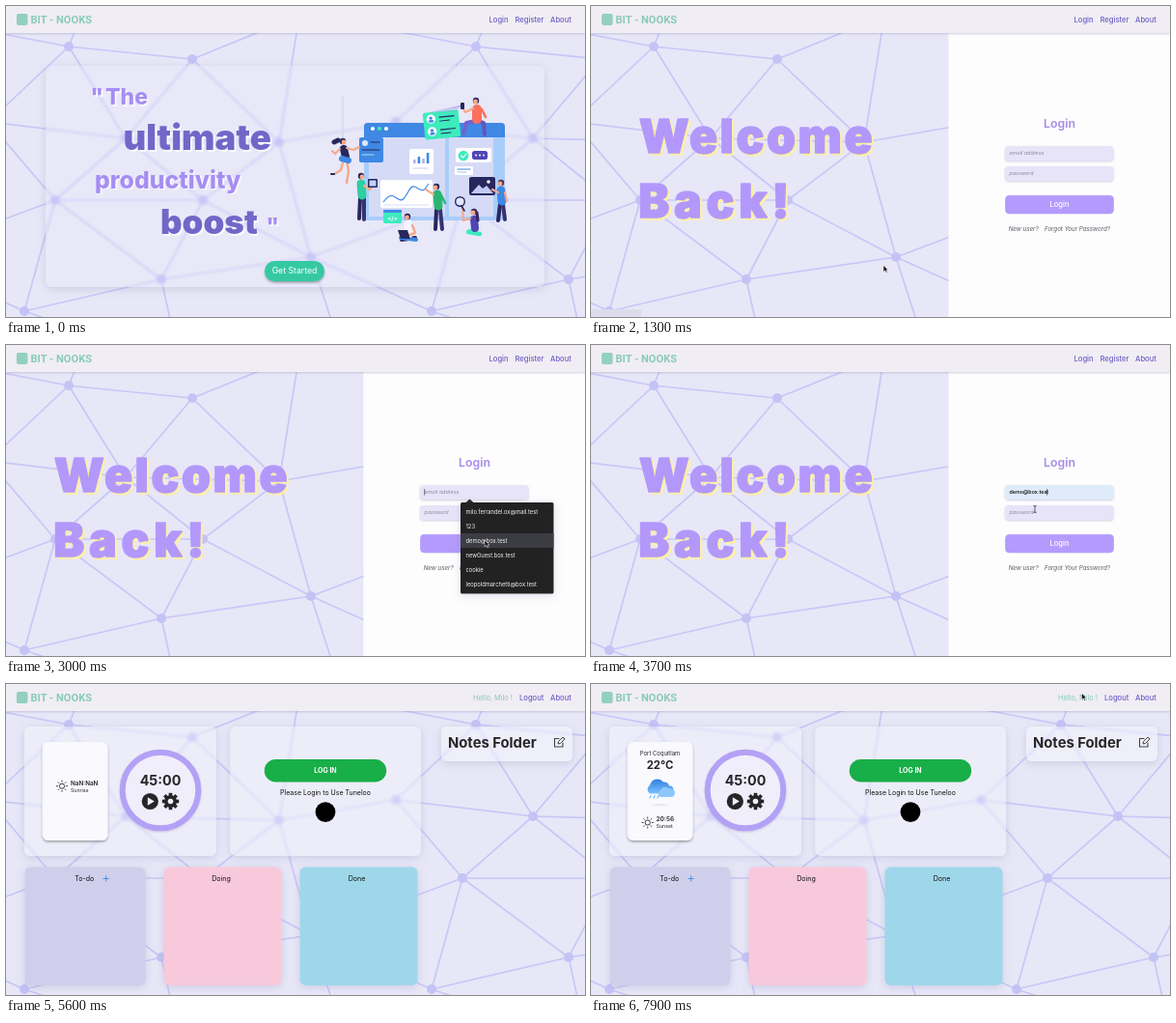
Write an HTML page that moves like this. It is 600 px wide and 322 px high and loops after 8000 ms.

```html
<!DOCTYPE html>
<html lang="en">
<head>
<meta charset="utf-8">
<title>Developer dashboard</title>
<style>
html, body { margin: 0; width: 100%; height: 100%; overflow: hidden; background: #e7e7f7; }
svg { display: block; width: 100%; height: 100%; font-family: Inter, Roboto, sans-serif; }
text { white-space: pre; }
</style>
</head>
<body>
<svg id="stage" viewBox="0 0 600 322" xmlns="http://www.w3.org/2000/svg"></svg>
<script>
const LOOP = 8000, STEP = 100;
const stage = document.getElementById('stage');

// ---- drawing helpers ----
const text = (x, y, size, str, fill, weight = 400, extra = '') =>
  `<text x="${x}" y="${y}" font-size="${size}" fill="${fill}" font-weight="${weight}" ${extra}>${str}</text>`;
const mid = 'text-anchor="middle"', slant = 'font-style="italic"';
const rect = (x, y, w, h, r, fill, extra = '') =>
  `<rect x="${x}" y="${y}" width="${w}" height="${h}" rx="${r}" fill="${fill}" ${extra}/>`;
const dot = (x, y, r, fill, extra = '') => `<circle cx="${x}" cy="${y}" r="${r}" fill="${fill}" ${extra}/>`;
const line = (pts, color, w, extra = '') =>
  `<polyline points="${pts}" fill="none" stroke="${color}" stroke-width="${w}" stroke-linecap="round" stroke-linejoin="round" ${extra}/>`;
const shape = (d, fill, extra = '') => `<path d="${d}" fill="${fill}" ${extra}/>`;
const group = (id, body, extra = '') => `<g id="${id}" ${extra}>${body}</g>`;

// ---- network backdrop: one tile repeated sideways ----
const TILE = 422;
const nodes = {
  a: [65, 42], b: [193, 55], c: [124, 137], d: [283, 141], e: [51, 201],
  f: [204, 201], g: [161, 283], h: [316, 260], i: [19, 316], j: [404, 120],
  p: [90, -20], q: [304, 10], r: [-60, 18], s: [180, 370], u: [345, 350],
  A: [487, 42], C: [546, 137], E: [473, 201], I: [441, 316]
};
const links = 'ab ac ap bc bd bq cd ce cf ef eg ei fd fg fh dh gh gi gs hE hI hu dj jA jC jE dq ar is'.split(' ');
const tile = links.map(([m, n]) => line([nodes[m], nodes[n]], '#c9c7f7', 1.7)).join('') +
  [...'abcdefghij'].map(k => dot(...nodes[k], 5, '#c4c3f6')).join('');

const glass = (id, x, y, w, h, r, alpha) =>
  `<clipPath id="${id}">${rect(x, y, w, h, r, '#000')}</clipPath>` +
  rect(x, y, w, h, r, '#e7e7f7', 'filter="url(#soft)"') +
  `<g clip-path="url(#${id})"><use href="#net" filter="url(#blur)"/></g>` +
  rect(x, y, w, h, r, '#fff', `fill-opacity="${alpha}"`);

const defs = `<defs>
  <filter id="blur" x="-5%" y="-5%" width="110%" height="110%"><feGaussianBlur stdDeviation="1.8"/></filter>
  <filter id="soft" x="-20%" y="-20%" width="140%" height="150%"><feDropShadow dx="0" dy="2" stdDeviation="4" flood-color="#7a78a8" flood-opacity=".25"/></filter>
  <filter id="drop" x="-20%" y="-40%" width="140%" height="200%"><feDropShadow dx="0" dy="1.5" stdDeviation="1.2" flood-color="#333" flood-opacity=".45"/></filter>
  <filter id="faint" x="-10%" y="-40%" width="120%" height="200%"><feDropShadow dx="0" dy="1" stdDeviation="1.3" flood-color="#8b84b5" flood-opacity=".4"/></filter>
  <linearGradient id="sky" x2="0" y2="1"><stop stop-color="#2f7fe0"/><stop offset="1" stop-color="#7cc0fa"/></linearGradient>
  <g id="tile">${tile}</g>
  <g id="net"><rect width="600" height="322" fill="#e7e7f7"/><use href="#tile" x="${-TILE}"/><use href="#tile"/><use href="#tile" x="${TILE}"/></g>
</defs>`;

// ---- header ----
const violet = '#6f5fc4', green = '#8acbb6';
const header = rect(0, 0, 600, 28, 0, '#f0edf4', 'filter="url(#faint)"') +
  rect(11, 8, 11.5, 12, 2, '#93d0be') +
  text(25.5, 18, 11.1, 'BIT - NOOKS', green, 700, 'font-family="Roboto, sans-serif"') +
  group('guest', text(500.5, 16.7, 7.6, 'Login', violet, 500) + text(527.5, 16.7, 7.6, 'Register', violet, 500)) +
  group('member', text(484, 16.7, 7.4, 'Hello, Milo !', green) + text(532, 16.7, 7.6, 'Logout', violet, 500)) +
  text(564, 16.7, 7.6, 'About', violet, 500);

// ---- landing page ----
const skin = '#f5a98a', navy = '#28275e', mint = '#3debbd', blue = '#3f88e4', pale = '#a9cdfb';
// limbs: list of [points, colour, width]; the head is drawn last
const person = (head, hair, limbs) =>
  limbs.map(l => line(...l)).join('') +
  dot(head[0], head[1], 3.2, hair) + dot(head[0] + head[2], head[1] + 1, 2.4, skin);

const art =
  line('349,94 349,136', '#cfd0ee', 1) +
  rect(371, 121, 146, 101, 4, pale) + shape('M371 136V125Q371 121 375 121H513Q517 121 517 125V136Z', blue) +
  rect(376, 136, 79, 82, 1, '#d5dbf6') + rect(459, 136, 46, 82, 1, '#d5dbf6') +
  [380, 387, 394].map((x, i) => dot(x, 127, 2.1, i === 1 ? mint : '#fff')).join('') +
  rect(418, 148, 25, 26, 1.5, '#fff') +
  [4, 7, 5, 11].map((h, i) => rect(422 + i * 4.6, 163 - h, 2.6, h, .5, i % 2 ? blue : '#a9b8ea')).join('') +
  line('422,168 437,168', '#c5cef2', 1.2) +
  rect(388, 180, 54, 29, 2, '#fff') +
  shape('M391 203C397 195 400 195 405 199S412 201 417 192 424 188 429 190 434 189 438 184', 'none', `stroke="${blue}" stroke-width="1.2"`) +
  line('392,206 438,206', '#c5cef2', .7) +
  rect(466, 147, 37, 15, 2, '#fff') + dot(474, 155, 5.3, mint) + line('471.5,155 473.5,157 477,153', '#fff', 1.1) +
  rect(483, 150, 16, 9, 2.5, '#4f46b4') + [487, 491, 495].map(x => dot(x, 154.5, 1, '#fff')).join('') +
  rect(465, 166, 19, 9, 1, '#fff') + line('468,169 481,169', blue, 1) + line('468,172 477,172', '#b1bceb', 1) +
  rect(480, 177, 27, 19, 2, navy) + shape('M482 194L490 185 494 189 498 186 505 194Z', '#c3c9f4') + dot(500, 182, 1.8, '#fff') +
  rect(366, 136, 25, 26, 2, blue) + dot(372, 142, 3, '#dce8fb') +
  line('378,141 387,141', navy, 1) + line('369,149 387,149', navy, 1.2) + line('369,154 381,154', '#bdd7fa', 1.2) +
  `<g transform="rotate(-6 451 123)">` + rect(433, 109, 37, 28, 2, mint) +
  [116, 129].map(y => dot(441, y, 4.7, '#fff') + dot(441, y - 1, 1.7, blue) + rect(438.5, y + 1, 5, 2.5, 1, blue) +
    line(`450,${y - 1} 465,${y - 1}`, navy, 1.2) + line(`450,${y + 3} 460,${y + 3}`, navy, 1)).join('') + '</g>' +
  [0, 1, 2, 3, 4].map(i => line(`${440 + i * 6},110 472,103`, '#9d9be0', .5, 'stroke-dasharray="1 1"')).join('') +
  // seated on the window
  person([487, 98, -.5], navy, [
    ['487,119 477,121 474,132', '#7362cd', 4], ['490,119 495,121 496,133', '#6554bf', 4],
    ['488,107 488,117', '#fa705c', 10], ['484,106 476,110 473,105', skin, 2.2], ['493,107 497,115', '#fa705c', 2.6]]) +
  rect(471, 100, 4, 7, 1, navy) +
  // reaching on the left
  person([349, 140, 1], navy, [
    ['350,158 347,170 340,174', skin, 2.4], ['353,158 355,171 353,183', skin, 2.4],
    ['344,139 340,141', navy, 5], ['350,148 352,156', navy, 8], ['348,158 355,160', blue, 6],
    ['353,147 360,149 366,146', skin, 2], ['346,148 341,153 338,150', skin, 2], ['340,174 337,174', navy, 2]]) +
  // with a tablet
  person([368, 176, 1], navy, [
    ['367,199 366,220', navy, 4], ['371,199 371,221', '#353470', 4],
    ['368,184 369,196', '#2fcf9f', 9], ['371,186 377,190 381,185', skin, 2.2]]) +
  rect(375, 179, 10, 9, 1, navy) + rect(376.5, 180.5, 7, 6, .5, '#b8d4ff') +
  // pointing at the chart
  person([446, 187, -1], navy, [
    ['446,211 445,231', navy, 4], ['450,211 452,231', '#353470', 4],
    ['447,195 448,207', '#2bb573', 9], ['443,195 435,190', skin, 2.2], ['451,196 455,204', '#2bb573', 2.6]]) +
  // at the right edge
  person([513, 183, -1], '#5b2d4a', [
    ['512,205 510,222', navy, 4], ['515,205 517,221', '#353470', 4],
    ['513,191 514,202', blue, 9], ['510,193 504,190', skin, 2.2], ['517,193 519,202', skin, 2.2]]) +
  // code card and laptop
  rect(391, 211, 19, 14, 1.5, mint) + rect(391, 211, 19, 3, 1, blue) + text(400.5, 222, 6, '&lt;/&gt;', '#fff', 700, mid) +
  person([416, 218, -.5], navy, [
    ['410,242 424,240', navy, 4], ['425,242 409,240', blue, 4], ['417,226 417,236', '#f4f5ff', 9], ['421,227 424,235 418,237', skin, 2.4]]) +
  shape('M406 232L416 232 419 241 409 241Z', navy) +
  // magnifier
  person([485, 213, -1], '#36265c', [
    ['486,232 479,234 491,236', mint, 4.5], ['485,221 486,230', '#4f46b4', 8],
    ['481,220 474,222 473,208', skin, 2.2], ['488,214 489,222', '#36265c', 3]]) +
  dot(470.5, 202.5, 4.8, '#dfe7ff', `stroke="${navy}" stroke-width="1.4"`) + line('472,207 475,212', navy, 1.6);

const glow = (x, y, size, str, fill, w) => text(x + 1.7, y + 1.5, size, str, '#fbfaff', w) + text(x, y, size, str, fill, w);
const lilac = '#a68df4', plum = '#7366c8';
const home = '<use href="#net"/>' + glass('g1', 41, 62, 517, 229, 7, .06) +
  glow(87.5, 102, 23, '"', lilac, 800) + glow(103, 102, 23, 'The', lilac, 800) +
  glow(121.5, 149, 36.6, 'ultimate', plum, 900) + glow(92, 188.5, 24.8, 'productivity', lilac, 800) +
  glow(160, 236, 35, 'boost', plum, 900) + glow(269.5, 236, 23, '"', lilac, 800) + art +
  rect(268, 264, 62, 21, 10.5, '#34c9a3', 'id="startBox" filter="url(#drop)"') +
  text(299, 277.4, 8.7, 'Get Started', '#fff', 400, mid + ' id="startText"');

// ---- login page ----
const poster = (x, y, str, gap) => ['#fdf0a6', '#b398fb'].map((c, i) =>
  text(x + 2.2 - i * 2.2, y + 2.2 - i * 2.2, 48, str, c, 900,
    `letter-spacing="${gap}" stroke="${c}" stroke-width="1.4" stroke-linejoin="round"`)).join('');
const mails = ['milo.ferrandel.ox@mail.test', '123', 'demo@box.test', 'newGuest.box.test', 'cookie', 'leopoldmarchetti@box.test'];
const login = '<use href="#net"/>' + poster(49.7, 151.8, 'Welcome', 2.6) + poster(49.2, 218.8, 'Back!', 4.8) +
  rect(370.5, 28, 229.5, 294, 0, '#fdfdfe') +
  text(485.5, 125.5, 12.3, 'Login', '#a68be9', 600, mid) +
  rect(429, 145, 112.5, 15, 4, '#e8e4f8', 'id="mailBox" filter="url(#faint)"') +
  rect(429, 166, 112.5, 15, 4, '#e8e4f8', 'filter="url(#faint)"') +
  text(433.5, 154, 5.4, 'email address', '#8d889f', 400, slant + ' id="mailHint"') +
  text(433.5, 154, 5.4, mails[2], '#000', 500, 'id="mail"') +
  text(433.5, 174.6, 5.4, 'password', '#8d889f', 400, slant + ' id="passHint"') +
  [0, 1, 2].map(i => dot(434.8 + i * 2.1, 173, .85, '#111', `id="key${i}"`)).join('') +
  rect(0, 0, .6, 6.5, 0, '#222', 'id="caret"') +
  rect(429.5, 196.3, 112, 18.6, 4, '#b49afc', 'id="loginBox" stroke-width=".7"') +
  text(485.5, 208.2, 7.5, 'Login', '#fff', 500, mid + ' id="loginText"') +
  text(432.7, 233, 6.2, 'New user?', '#5a5861', 400, slant) + text(470, 233, 6.2, 'Forgot Your Password?', '#5a5861', 400, slant) +
  group('menu', shape('M476 163.5L480.5 159.5 485 163.5Z', '#202124') + rect(471, 163, 96.5, 94.5, 1.5, '#202124', 'filter="url(#soft)"') +
    rect(471, 195, 96.5, 15, 0, '#3c3d42', 'id="pick"') +
    mails.map((m, i) => text(476.5, 174.5 + i * 15.15, 5.8, m, '#f3f3f5')).join('')) +
  rect(0, 314, 52, 8, 1.5, '#dcdcea', 'id="status"');

// ---- dashboard ----
const ink = '#262628';
const rays = (x, y, n, r1, r2, color, w) => Array.from({ length: n }, (_, i) => {
  const a = i * 2 * Math.PI / n, c = Math.cos(a), s = Math.sin(a);
  return line(`${x + c * r1},${y + s * r1} ${x + c * r2},${y + s * r2}`, color, w, 'style="stroke-linecap:butt"');
}).join('');
const sun = (x, y) => dot(x, y, 2.6, 'none', `stroke="${ink}" stroke-width=".9"`) + rays(x, y, 8, 4.2, 6, ink, .9);
const board = (x, w, fill, label, cx) =>
  rect(x, 189.5, w, 122.5, 6, fill, 'filter="url(#soft)"') + text(cx, 204, 7.1, label, '#111', 400, mid);
const dash = '<use href="#net"/>' +
  glass('g2', 19, 44, 199, 134, 6, .24) + glass('g3', 232.5, 44, 197.5, 134, 6, .24) + glass('g4', 451, 44, 136, 36, 6, .3) +
  rect(37.7, 60, 67.8, 102, 6, '#f9f9fe', 'filter="url(#drop)"') +
  group('waiting', sun(58, 105.7) + text(67, 104.5, 6.3, 'NaN:NaN', ink, 600) + text(67, 111.6, 5.2, 'Sunrise', ink)) +
  group('weather', text(71.5, 73.6, 5.9, 'Port Coquitlam', ink, 400, mid) + text(71.5, 88, 11.3, '22°C', ink, 700, mid) +
    shape('M61 113.5a5 5 0 0 1 0-8.5a8 8 0 0 1 14-3.5a5.5 5.5 0 0 1 6 4a4 4 0 0 1 1 8Z', 'url(#sky)') +
    shape('M72 117a4 4 0 0 1 0-7a5.5 5.5 0 0 1 9-1.5a4.3 4.3 0 0 1 3 8.5Z', '#8cc8fb') +
    [62, 66, 70].map(x => line(`${x},115.5 ${x - 1},118`, '#4c9bea', .9)).join('') +
    `<ellipse cx="71.5" cy="125" rx="9" ry=".8" fill="#dfe3ee"/>` +
    sun(58.7, 143.5) + text(67.5, 142.2, 6.5, '20:56', ink, 600) + text(67.5, 149.4, 5.3, 'Sunset', ink)) +
  dot(160, 110, 39.3, '#f0eefb', 'stroke="#b3a1f6" stroke-width="6" filter="url(#faint)"') +
  text(160, 104.8, 14.3, '45:00', ink, 700, mid) +
  dot(149.3, 121.5, 8.6, ink) + shape('M146.8 117.3L153.8 121.5 146.8 125.7Z', '#f0eefb') +
  dot(170.5, 121.5, 6.5, ink) + rays(170.5, 121.5, 8, 5, 8.7, ink, 3.6) + dot(170.5, 121.5, 2.8, '#f0eefb') +
  rect(267.7, 78, 126.5, 23.5, 11.75, '#18ae48') + text(331, 92.3, 7, 'LOG IN', '#fff', 700, mid) +
  text(331, 115, 7, 'Please Login to Use Tuneloo', '#111', 400, mid) + dot(331, 132.6, 10.4, '#000') +
  text(458, 65.5, 14.8, 'Notes Folder', ink, 700) +
  line('573,56.5 568.5,56.5 568.5,65 577,65 577,61', '#444', 1.1) +
  shape('M572 62L572.5 59.5 577 55 579 57 574.5 61.5Z', 'none', 'stroke="#444" stroke-width="1"') +
  board(19.5, 125, '#cfcfec', 'To-do', 81.3) + board(163.5, 122, '#f7c9db', 'Doing', 223) + board(304.5, 122, '#9fd7ea', 'Done', 363.5) +
  line('101,201.5 106.4,201.5', '#3d8fe0', .9) + line('103.7,198.8 103.7,204.2', '#3d8fe0', .9);

// ---- pointer shapes, hot spot at 0,0 ----
const pointers =
  group('arrow', shape('M0 0V6.8L1.7 5.3 2.8 7.8 4 7.3 2.9 4.9H5Z', '#111', 'stroke="#fff" stroke-width=".5"')) +
  group('beam', line('-1.2,-3.5 0,-3 1.2,-3.5', '#222', .7) + line('0,-3 0,3', '#222', .7) + line('-1.2,3.5 0,3 1.2,3.5', '#222', .7)) +
  group('hand', shape('M-.9-2.5Q0-3.5 .7-2.5V-.2L3 .2Q4 .5 3.8 1.7L3 4.3H-.8L-2.7 1.5Q-2.8 .4-1.9 .7L-.9 1.5Z', '#fff', 'stroke="#222" stroke-width=".7"'));

stage.innerHTML = defs + group('home', home) + group('login', login) + group('dash', dash) + header + group('pointer', pointers);

// ---- timeline ----
const at = id => document.getElementById(id);
const show = (id, on) => { at(id).style.display = on ? '' : 'none'; };
const paint = (id, props) => { for (const k in props) at(id).setAttribute(k, props[k]); };

const path = [ // time, x, y
  [200, 520, 60], [800, 303, 268.5], [1400, 303, 268.5], [2100, 461, 152.5], [2600, 461, 152.5],
  [3000, 496, 202], [3200, 496, 202], [3600, 460, 170], [4300, 460, 170], [4600, 535, 207.5],
  [5200, 535, 207.5], [7000, 470, 130], [7700, 508.5, 9.5]
];
const modes = [ // from, pointer kind
  [0, ''], [200, 'arrow'], [800, 'hand'], [1100, 'arrow'], [2100, 'beam'], [2700, 'arrow'], [3500, 'beam'],
  [3900, ''], [4400, 'arrow'], [4500, 'hand'], [5200, ''], [7000, 'arrow']
];

function pointerAt(t) {
  let k = 1;
  while (k < path.length - 1 && path[k][0] < t) k++;
  const [t0, x0, y0] = path[k - 1], [t1, x1, y1] = path[k];
  const p = Math.min(1, Math.max(0, (t - t0) / (t1 - t0)));
  const e = p * p * (3 - 2 * p);
  return [x0 + (x1 - x0) * e, y0 + (y1 - y0) * e];
}

function draw(t) {
  const within = (a, b) => t >= a && t < b;
  const logged = t >= 5200, filled = t >= 3200;
  show('home', t < 1100);
  show('login', within(1100, 5200));
  show('dash', logged);
  show('guest', !logged);
  show('member', logged);
  show('status', within(1100, 1600));

  const overStart = within(800, 1100), overLogin = within(4500, 5200);
  paint('startBox', { fill: overStart ? '#fdfdfe' : '#34c9a3' });
  paint('startText', { fill: overStart ? '#34c9a3' : '#fff' });
  paint('loginBox', { fill: overLogin ? '#fdfdfe' : '#b49afc', stroke: overLogin ? '#b3a8d2' : '#b49afc' });
  paint('loginText', { fill: overLogin ? '#b49afc' : '#fff' });

  show('menu', within(2300, 3200));
  show('pick', within(2900, 3200));
  show('mailHint', !filled);
  show('mail', filled);
  paint('mailBox', { fill: filled ? '#dfebfa' : '#e8e4f8' });
  const keys = [3900, 4000, 4200].filter(k => t >= k).length;
  show('passHint', !keys);
  for (let i = 0; i < 3; i++) show('key' + i, i < keys);
  show('caret', within(2300, 4500));
  const inPass = t >= 3800;
  paint('caret', { x: inPass ? 433.5 + keys * 2.2 : filled ? 472 : 433.5, y: inPass ? 169.7 : 149 });

  show('waiting', t < 6200);
  show('weather', t >= 6200);

  const kind = modes.filter(m => m[0] <= t).pop()[1];
  for (const k of ['arrow', 'beam', 'hand']) show(k, k === kind);
  paint('pointer', { transform: `translate(${pointerAt(t)})` });
}

const begin = performance.now();
function tick(now) {
  const t = Math.max(0, now - begin) % LOOP;
  draw(Math.floor(t / STEP) * STEP);
  requestAnimationFrame(tick);
}
draw(0);
requestAnimationFrame(tick);
</script>
</body>
</html>
```
